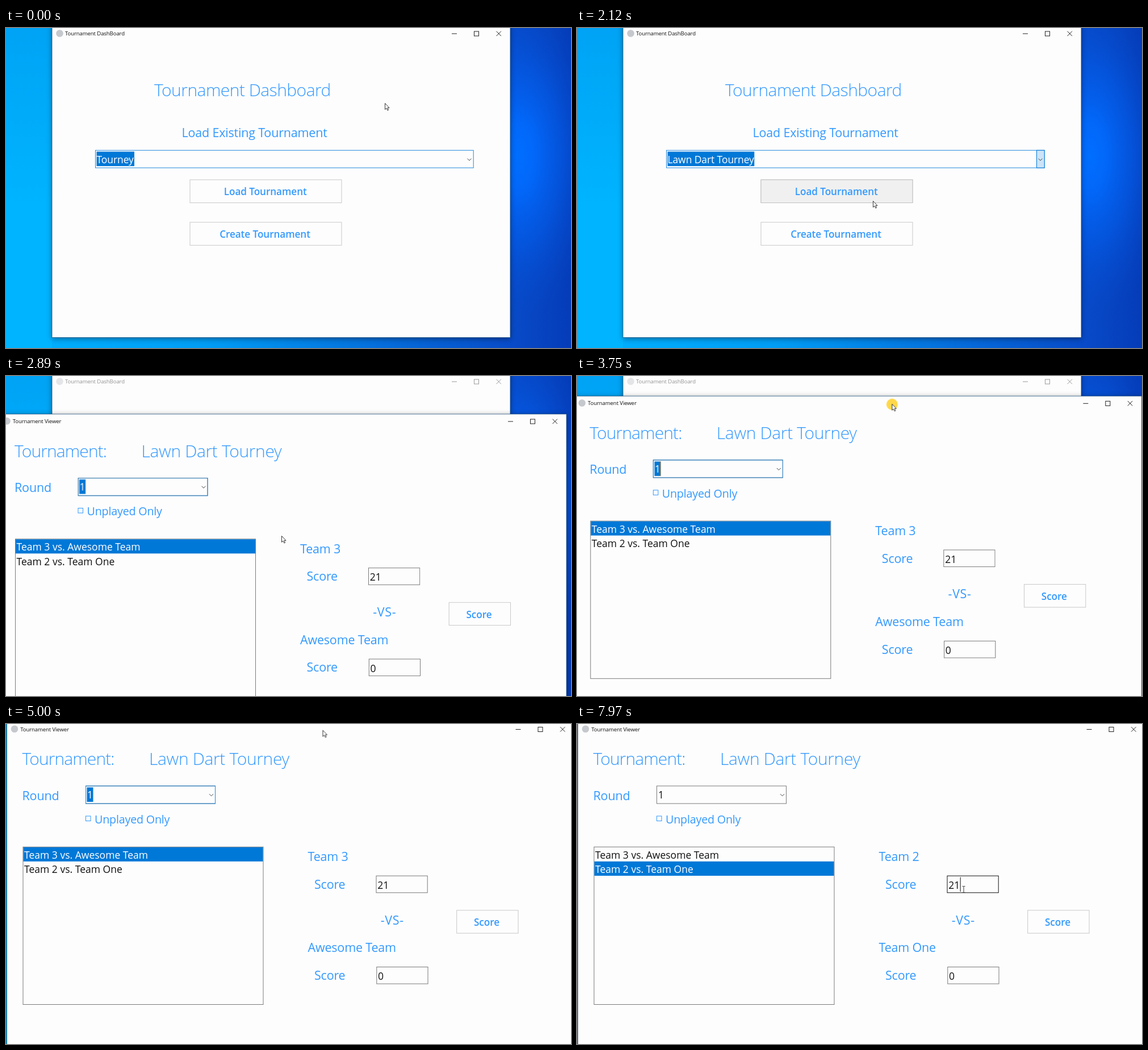
Animation of 995x563 px, one loop 8 s. Source, as an HTML page:

```html
<!DOCTYPE html>
<html lang="en">
<head>
<meta charset="utf-8">
<title>Tournament Dashboard</title>
<style>
html, body { margin: 0; width: 100%; height: 100%; overflow: hidden; background: #fdfdfd; }
svg { display: block; width: 100%; height: 100%; }
text { font: 17.5px "Open Sans", "Noto Sans", sans-serif; fill: #111; white-space: pre; }
.title { font-size: 30px; font-weight: 300; letter-spacing: -.018em; fill: #39f; }
.label { font-size: 21.5px; letter-spacing: -.009em; fill: #39f; }
.check { font-size: 19.7px; letter-spacing: -.01em; fill: #39f; }
.btn { font-size: 17.2px; font-weight: 600; letter-spacing: -.005em; fill: #39f; text-anchor: middle; }
.bar { font-size: 9.6px; letter-spacing: -.012em; }
.lit { fill: #fff; }
.sel { fill: #0078d7; }
.win { fill: #fdfdfd; stroke: #1c4f7c; stroke-opacity: .75; filter: drop-shadow(0 2px 5px rgba(0, 0, 0, .4)); }
.box { fill: #fdfdfd; stroke: #7a7a7a; }
.focus { fill: none; stroke: #1e88dc; }
.button { fill: #fdfdfd; stroke: #c8c8c8; }
.line { fill: none; stroke: #444; }

/* hard switches */
[class*="t-"] { animation: 8s step-end infinite; }
.t-before-pick { animation-name: before-pick; }
.t-after-pick { animation-name: after-pick; }
.t-arrow-hot { animation-name: arrow-hot; }
.t-row1 { animation-name: row1; }
.t-row2 { animation-name: row2; }
.t-row3 { animation-name: row3; }
.t-row-bar { animation-name: row-bar; }
.t-inactive { animation-name: inactive; }
.t-first { animation-name: first; }
.t-second { animation-name: second; }
.t-round-caret { animation-name: round-caret; }
.t-list-focus { animation-name: list-focus; }
.t-input-focus { animation-name: input-focus; }
.t-zero { animation-name: zero; }
.t-digit2 { animation-name: digit2; }
.t-digit1 { animation-name: digit1; }
.t-caret { animation-name: caret; }
.t-arrow { animation-name: arrow; }
.t-beam { animation-name: beam; }
.t-halo { animation-name: halo; }
@keyframes before-pick { 0% { opacity: 1 } 25.5%, to { opacity: 0 } }
@keyframes after-pick { 0% { opacity: 0 } 25.5%, to { opacity: 1 } }
@keyframes arrow-hot { 0% { opacity: 0 } 12%, to { opacity: 1 } }
@keyframes row1 { 0% { fill: #fff } 21%, to { fill: #111 } }
@keyframes row2 { 0% { fill: #111 } 21% { fill: #fff } 23%, to { fill: #111 } }
@keyframes row3 { 0% { fill: #111 } 23%, to { fill: #fff } }
@keyframes row-bar { 0% { transform: none } 21% { transform: translateY(25px) } 23%, to { transform: translateY(50px) } }
@keyframes inactive { 0% { opacity: 1 } 33%, to { opacity: .45 } }
@keyframes first { 0% { opacity: 1 } 73.25%, to { opacity: 0 } }
@keyframes second { 0% { opacity: 0 } 73.25%, to { opacity: 1 } }
@keyframes round-caret { 0% { opacity: 1 } 60.4%, to { opacity: 0 } }
@keyframes list-focus { 0% { stroke: #7a7a7a } 73.25% { stroke: #111 } 86%, to { stroke: #7a7a7a } }
@keyframes input-focus { 0% { stroke: #7a7a7a } 86%, to { stroke: #111 } }
@keyframes zero { 0% { opacity: 1 } 97.6%, to { opacity: 0 } }
@keyframes digit2 { 0% { opacity: 0 } 98.6%, to { opacity: 1 } }
@keyframes digit1 { 0% { opacity: 0 } 99.5%, to { opacity: 1 } }
@keyframes caret {
  0% { opacity: 0; transform: none }
  86% { opacity: 1; transform: none }
  94.5% { opacity: 0; transform: none }
  97.6% { opacity: 1; transform: translateX(-10px) }
  98.6% { opacity: 1; transform: none }
  99.5%, to { opacity: 1; transform: translateX(10px) }
}
@keyframes arrow { 0% { opacity: 1 } 8.75% { opacity: 0 } 12% { opacity: 1 } 82.5%, to { opacity: 0 } }
@keyframes beam { 0% { opacity: 0 } 8.75% { opacity: 1 } 12% { opacity: 0 } 82.5%, to { opacity: 1 } }
@keyframes halo {
  0%, 13.75%, 25.5%, 32%, 62.5%, 74.25%, 88.75%, to { opacity: 0 }
  12.25%, 24.5%, 30.5%, 42.5%, 73%, 86% { opacity: 1 }
}

/* motion */
.drop { animation: drop 8s linear infinite; }
@keyframes drop {
  0%, 12.75% { clip-path: inset(0 0 100% 0); opacity: 1 }
  15%, 25.49% { clip-path: inset(0 0 0 0); opacity: 1 }
  25.5%, to { clip-path: inset(0 0 0 0); opacity: 0 }
}
.appear { animation: appear 8s linear infinite; }
@keyframes appear { 0%, 33% { opacity: 0 } 35%, to { opacity: 1 } }
.viewer { animation: drag 8s ease-in-out infinite; }
@keyframes drag {
  0%, 42.875% { transform: translate(-13.5px, 70.5px) }
  51.6%, 53.5% { transform: translate(3.5px, -3px) }
  55.6%, 58.5% { transform: translate(1.5px, -1.5px) }
  60.4%, to { transform: none }
}
.cursor { animation: roam 8s ease-in-out infinite; }
@keyframes roam {
  0%, 3% { transform: translate(667px, 132px) }
  9.75%, 11.5% { transform: translate(786px, 232px) }
  12.25%, 17.75% { transform: translate(814px, 233px) }
  23.6%, 26.75% { transform: translate(521px, 304px) }
  30%, 36.2% { transform: translate(485px, 281px) }
  41%, 42.875% { transform: translate(547px, 80.5px) }
  51.6%, 53.5% { transform: translate(564px, 7px) }
  55.6%, 58.5% { transform: translate(562px, 8.5px) }
  60.4% { transform: translate(560px, 10.5px) }
  62.5% { transform: translate(557.5px, 10.5px) }
  72.4%, 74.5% { transform: translate(250px, 256px) }
  81.9% { transform: translate(630px, 304px) }
  83.9%, to { transform: translate(679px, 290px) }
}
</style>
</head>
<body>
<svg viewBox="0 0 995 563">
  <defs>
    <linearGradient id="sky"><stop stop-color="#00b2ff"/><stop offset=".35" stop-color="#009df5"/><stop offset=".9" stop-color="#084ac8"/><stop offset="1" stop-color="#053cb8"/></linearGradient>
    <linearGradient id="left" x2="0" y2="1"><stop stop-color="#00a3f5"/><stop offset=".55" stop-color="#00b4ff"/><stop offset="1" stop-color="#00b4ff"/></linearGradient>
    <radialGradient id="glow" gradientUnits="userSpaceOnUse" cx="0" cy="0" r="1" gradientTransform="translate(902 225) scale(140 290)"><stop stop-color="#006eff"/><stop offset=".2" stop-color="#0268fa"/><stop offset=".55" stop-color="#0458e2" stop-opacity=".75"/><stop offset="1" stop-color="#0548c8" stop-opacity="0"/></radialGradient>
    <g id="controls" fill="none" stroke="#222">
      <path d="M-4.5.5h9M74 -3.8l8.4 8.4M82.4 -3.8L74 4.6"/>
      <rect x="35" y="-3.5" width="8" height="8"/>
    </g>
    <path id="chevron" d="M-3.5 -1.8L0 1.7L3.5 -1.8" class="line"/>
  </defs>

  <rect width="995" height="563" fill="url(#sky)"/>
  <rect width="81" height="563" fill="url(#left)"/>
  <rect x="760" width="235" height="563" fill="url(#glow)"/>

  <g>
    <rect class="win" x="81" y="-6" width="807" height="550.5"/>
    <g class="t-inactive">
      <circle cx="94.5" cy="9.5" r="6.3" fill="#c5c8cd"/>
      <text class="bar" x="104" y="13.3">Tournament DashBoard</text>
      <use href="#controls" x="789.5" y="9.5"/>
    </g>
    <text class="title" x="261" y="120.3">Tournament Dashboard</text>
    <text class="label" x="309.5" y="191.5">Load Existing Tournament</text>

    <rect class="focus" x="157.5" y="215.2" width="665.7" height="30.8"/>
    <rect class="t-arrow-hot" x="809.5" y="215.2" width="13.7" height="30.8" fill="#cce4f7" stroke="#0078d7"/>
    <use href="#chevron" x="816" y="231.5"/>
    <g class="t-before-pick">
      <rect class="sel" x="159.5" y="217.5" width="66.5" height="25.5"/>
      <text class="lit" x="159.5" y="237.5" letter-spacing="-.1">Tourney</text>
    </g>
    <g class="t-after-pick">
      <rect class="sel" x="159.5" y="217.5" width="152.8" height="25.5"/>
      <text class="lit" x="159.5" y="237.5" letter-spacing="-.1">Lawn Dart Tourney</text>
    </g>

    <rect class="button" x="324" y="267" width="267" height="40.5"/>
    <rect class="t-after-pick" x="324" y="267" width="267" height="40.5" fill="#f0f0f0" stroke="#c0c0c0"/>
    <text class="btn" x="456.7" y="294">Load Tournament</text>
    <rect class="button" x="324" y="341.8" width="267" height="40.5"/>
    <text class="btn" x="456" y="369">Create Tournament</text>

    <g class="drop">
      <rect x="160" y="249" width="666" height="77" fill="#000" opacity=".15"/>
      <rect x="157.5" y="246.5" width="665.5" height="76" fill="#fdfdfd" stroke="#0078d7"/>
      <rect class="sel t-row-bar" x="158" y="247" width="664.5" height="25"/>
      <text class="t-row1" x="160" y="266">Tourney</text>
      <text class="t-row2" x="160" y="291">Open Tourney</text>
      <text class="t-row3" x="160" y="316">Lawn Dart Tourney</text>
    </g>
  </g>

  <g class="appear"><g class="viewer">
    <rect class="win" x="1.5" y="-3.5" width="999" height="567.5"/>
    <circle cx="15" cy="8.7" r="6.3" fill="#c5c8cd"/>
    <text class="bar" x="25.2" y="12.6">Tournament Viewer</text>
    <use href="#controls" x="902" y="9"/>
    <text class="title" x="28.5" y="72" style="letter-spacing:-.03em">Tournament:</text>
    <text class="title" x="252" y="72" style="letter-spacing:-.012em">Lawn Dart Tourney</text>

    <text class="label" x="28.5" y="133.5">Round</text>
    <rect class="box" x="140.5" y="109" width="228" height="31"/>
    <use href="#chevron" x="361.5" y="125"/>
    <g class="t-first">
      <rect class="focus" x="140.5" y="109" width="228" height="31"/>
      <rect class="sel" x="142.5" y="111.5" width="11" height="25.5"/>
      <text class="lit" x="143" y="131">1</text>
      <path class="t-round-caret" d="M153.5 111.5v25.5" stroke="#e08a2a"/>
    </g>
    <text class="t-second" x="143" y="131">1</text>
    <rect x="140.5" y="162" width="8.5" height="8.5" fill="#fdfdfd" stroke="#39f"/>
    <text class="check" x="156" y="174.7">Unplayed Only</text>

    <rect class="box t-list-focus" x="30" y="216.3" width="423" height="277.2"/>
    <g class="t-first">
      <rect class="sel" x="30.5" y="216.8" width="422" height="25"/>
      <text class="lit" x="32" y="236.7">Team 3 vs. Awesome Team</text>
      <text x="32" y="262">Team 2 vs. Team One</text>
      <text class="label" x="531.5" y="241">Team 3</text>
      <text class="label" x="531.5" y="401">Awesome Team</text>
    </g>
    <g class="t-second">
      <rect class="sel" x="30.5" y="241.8" width="422" height="25.2"/>
      <text x="32" y="236.7">Team 3 vs. Awesome Team</text>
      <text class="lit" x="32" y="262">Team 2 vs. Team One</text>
      <text class="label" x="531.5" y="241">Team 2</text>
      <text class="label" x="531.5" y="401">Team One</text>
    </g>

    <text class="label" x="543" y="289.8">Score</text>
    <rect class="box t-input-focus" x="652" y="267.2" width="90.2" height="29.6"/>
    <text class="t-first" x="654.3" y="289.8">21</text>
    <g class="t-second">
      <text class="t-zero" x="654.3" y="289.8">0</text>
      <text class="t-digit2" x="654.3" y="289.8">2</text>
      <text class="t-digit1" x="664.2" y="289.8">1</text>
    </g>
    <path class="t-caret" d="M665.2 269.5v25.5" stroke="#111"/>
    <text class="label" x="680.3" y="352.5" text-anchor="middle" style="letter-spacing:.03em">-VS-</text>
    <rect class="button" x="793.7" y="327.8" width="108.3" height="40.3"/>
    <text class="btn" x="846.5" y="355">Score</text>
    <text class="label" x="543" y="449.8">Score</text>
    <rect class="box" x="652.8" y="427.5" width="90.2" height="29.6"/>
    <text x="655" y="450">0</text>
  </g></g>

  <g class="cursor">
    <circle class="t-halo" cx=".5" cy="1" r="10" fill="#ffd84a"/>
    <path class="t-arrow" d="M.5.5V11.4L3 9.1L4.9 13L6.6 12.2L4.9 8.4H8Z" fill="#fff" stroke="#222" stroke-width=".9"/>
    <path class="t-beam" d="M-.5 -4.5H1.5L2 -4L2.5 -4.5H4.5M2 -4V6M-.5 6.5H1.5L2 6L2.5 6.5H4.5" fill="none" stroke="#222" stroke-width=".9"/>
  </g>
</svg>
</body>
</html>
```
